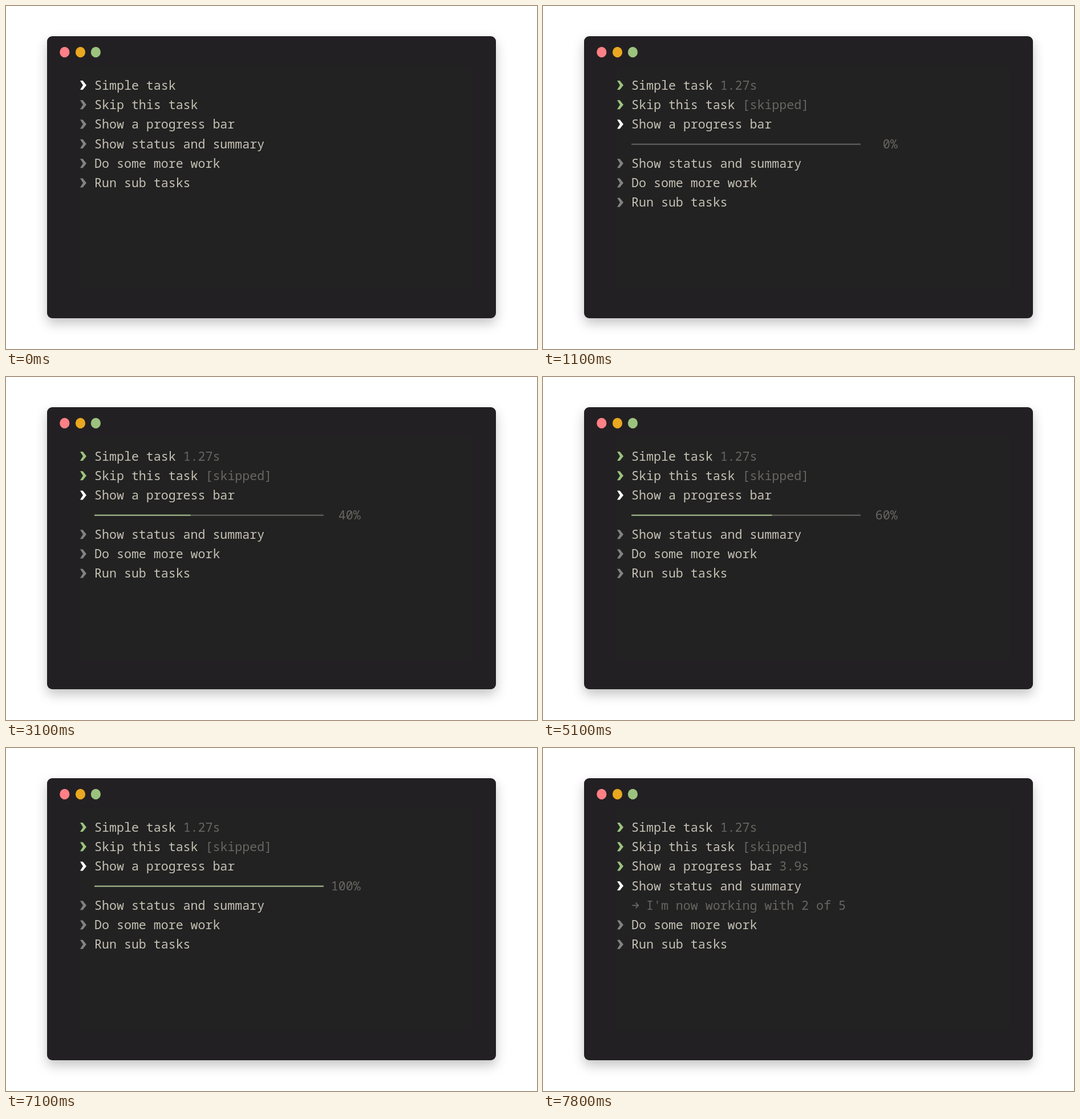
An HTML page that plays this animation: 931 by 602 pixels, repeating every 8000 ms.

```html
<!DOCTYPE html>
<html lang="en">
<head>
<meta charset="utf-8">
<title>Task list</title>
<style>
  html, body { margin: 0; width: 100%; height: 100%; overflow: hidden; background: #fff; }
  svg { display: block; }
  .window { fill: #232023; filter: drop-shadow(0 9px 10px rgba(0, 0, 0, .23)); }
  text { font: 21.6px "Noto Sans Mono", "DejaVu Sans Mono", monospace; fill: #c5c1b4; }
  text.dim { fill: #686662; }
  .arrow { fill: none; stroke: #686662; stroke-width: 1.9; }
</style>
</head>
<body>
<svg width="931" height="602" viewBox="0 0 931 602">
  <rect class="window" x="72" y="53" width="787" height="495" rx="9"/>
  <rect x="129" y="105" width="690" height="391" fill="#222"/>
  <ellipse cx="102.8" cy="81" rx="8.6" ry="9.2" fill="#ff8086"/>
  <ellipse cx="130.5" cy="81" rx="8.6" ry="9.2" fill="#e9a820"/>
  <ellipse cx="157.4" cy="81" rx="8.6" ry="9.2" fill="#9bc37e"/>
  <g id="screen"></g>
</svg>
<script>
const LOOP = 8000, LEFT = 129.2, CELL = 12.96, TOP = 139, LINE = 34.3, BAR_CELLS = 31;
const GREEN = '#9bc37e', WHITE = '#fff', GRAY = '#828282';
const tasks = ['Simple task', 'Skip this task', 'Show a progress bar',
  'Show status and summary', 'Do some more work', 'Run sub tasks'];
const progressSteps = [[1100, 0], [2100, 20], [3100, 40], [5100, 60], [6100, 80], [7100, 100]];
const screen = document.getElementById('screen');

const colX = col => LEFT + col * CELL;
const rowY = row => TOP + row * LINE;
const text = (col, row, str, cls = '') =>
  `<text class="${cls}" x="${colX(col)}" y="${rowY(row) + 7.6}">${str}</text>`;
const chevron = (row, color) =>
  `<path transform="translate(130 ${rowY(row)})" fill="${color}" d="M0-8H4.6L11 0 4.6 8H0L5 0Z"/>`;
const line = (row, cells, color) =>
  `<rect x="${colX(2)}" y="${rowY(row) - .3}" width="${cells * CELL}" height="2" fill="${color}"/>`;

function progressBar(row, percent) {
  const label = percent + '%';
  return line(row, BAR_CELLS, '#686662') +
    line(row, Math.ceil(BAR_CELLS * percent / 100), '#a2ba89') +
    text(38 - label.length, row, label, 'dim');
}

function status(row, current) {
  return `<path class="arrow" transform="translate(156.5 ${rowY(row)})" d="M0 0H10.5M6-4.8L10.7 0 6 4.8"/>` +
    text(4, row, `I'm now working with ${current} of 5`, 'dim');
}

function render(t) {
  const active = [1000, 1100, 7300].filter(start => t >= start).length;
  const notes = [t >= 1000 && '1.27s', t >= 1000 && '[skipped]', t >= 7300 && '3.9s'];
  let row = 0, out = '';
  tasks.forEach((task, i) => {
    out += chevron(row, i < active ? GREEN : i === active ? WHITE : GRAY) + text(2, row, task);
    if (notes[i]) out += text(task.length + 3, row, notes[i], 'dim');
    row++;
    if (i !== active) return;
    if (i === 2) out += progressBar(row++, progressSteps.findLast(([start]) => t >= start)[1]);
    if (i === 3) out += status(row++, t < 7800 ? 1 : 2);
  });
  return out;
}

let shown = '';
function tick() {
  const next = render(performance.now() % LOOP);
  if (next !== shown) screen.innerHTML = shown = next;
  requestAnimationFrame(tick);
}
tick();
</script>
</body>
</html>
```
